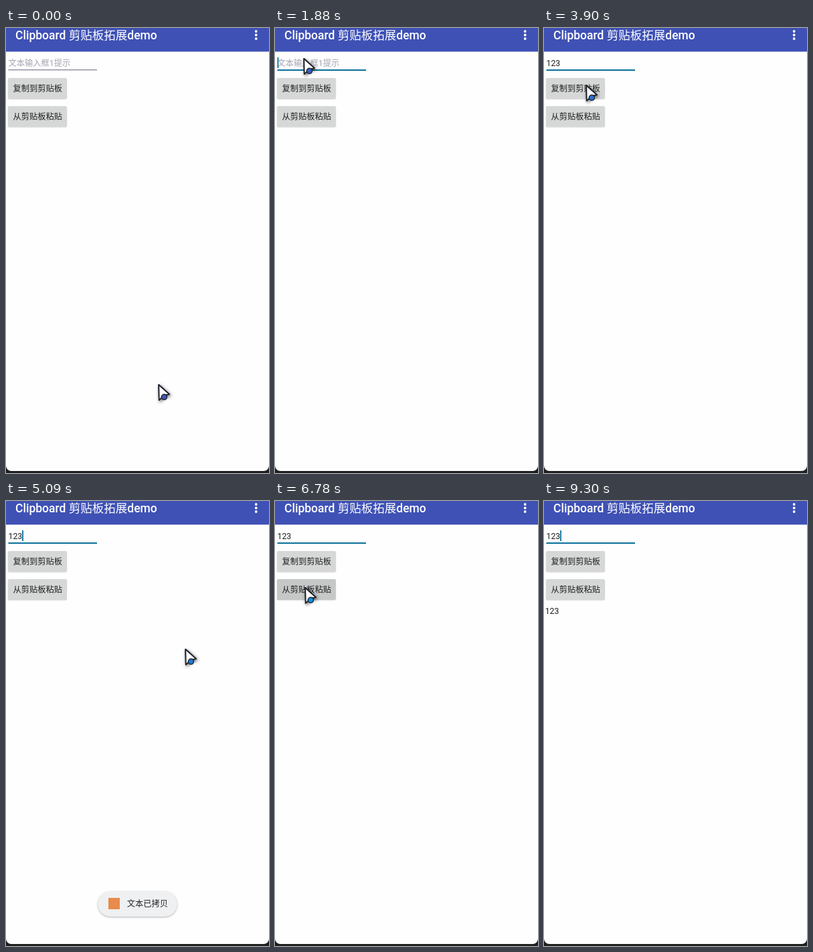
These frames come from a looping animation (393 px wide and 666 px high, 9.43 s). An HTML page with a canvas:

```html
<!DOCTYPE html>
<html lang="zh-CN">
<head>
<meta charset="utf-8">
<title>Clipboard demo</title>
<style>
html, body { margin: 0; width: 100%; height: 100%; overflow: hidden; background: #fff; }
canvas { display: block; width: 393px; height: 666px; }
</style>
</head>
<body>
<canvas id="stage"></canvas>
<script>
const W = 393, H = 666, LOOP = 9430;
const canvas = document.getElementById('stage');
const ctx = canvas.getContext('2d');
const dpr = window.devicePixelRatio || 1;
canvas.width = W * dpr;
canvas.height = H * dpr;

const FONT = 'Roboto, "Noto Sans CJK SC", "Noto Sans CJK", sans-serif';
const SMALL = '400 12.25px ' + FONT;
const TEAL = '#08709a';

// User actions, in ms
const FOCUS = 1840, KEYS = [2330, 2550, 3100];
const COPY = 3620, PASTE = 6650, PRESS = 270, PASTED = 7010;
const BLINK = 990, STEP = 90, FADE = 170, LEAVE = 8180;

// Pointer glides: begin, end, and the place reached
const HOME = { x: 227, y: 532 };
const glides = [
  [70, 70, 218, 428],
  [580, 890, 90, 298],
  [1050, 1230, 64, 128],
  [1350, 1880, 42, 44],
  [2650, 2860, 61, 73],
  [2930, 3330, 62, 84],
  [4740, 5090, 267, 220],
  [5560, 5630, 250, 255],
  [5790, 6030, 73, 247],
  [6090, 6570, 44, 128],
  [6920, 7380, 303, 392],
  [7790, 7980, 304, 543]
];
const toasts = [
  { text: '文本已拷贝', from: 4090, to: 6000 },
  { text: '文本已粘贴', from: 7100, to: 9280 }
];

const clamp = v => Math.min(1, Math.max(0, v));
const mix = (a, b, u) => a + (b - a) * u;
const easeOut = u => 1 - (1 - u) ** 2;

function pointerAt(t) {
  let { x, y } = HOME;
  for (const [begin, end, toX, toY] of glides) {
    if (t < begin) break;
    const last = Math.round((end - begin) / STEP);
    const done = t >= end ? last : Math.floor((t - begin) / (end - begin) * last);
    const u = easeOut((done + 1) / (last + 1));
    x = mix(x, toX, u);
    y = mix(y, toY, u);
  }
  return { x, y };
}

function box(x, y, w, h, r, fill) {
  ctx.fillStyle = fill;
  ctx.beginPath();
  ctx.roundRect(x, y, w, h, r);
  ctx.fill();
}

function dot(x, y, r) {
  ctx.beginPath();
  ctx.arc(x, y, r, 0, Math.PI * 2);
  ctx.fill();
}

function label(str, x, y, color, font = SMALL) {
  ctx.font = font;
  ctx.fillStyle = color;
  ctx.fillText(str, x, y);
}

function shadow(color, blur, dx, dy) {
  ctx.shadowColor = color;
  ctx.shadowBlur = blur * dpr;
  ctx.shadowOffsetX = dx * dpr;
  ctx.shadowOffsetY = dy * dpr;
}

function drawPage() {
  ctx.fillStyle = '#1f1f1f';
  ctx.fillRect(0, 0, W, H);
  box(0, -20, W, 683, 8, '#fefefe');
  ctx.fillStyle = '#3f51b5';
  ctx.fillRect(0, 0, W, 35.4);
  label('Clipboard 剪贴板拓展demo', 14, 17.4, '#fff', '500 17.5px ' + FONT);
  ctx.fillStyle = '#fff';
  for (let i = 0; i < 3; i++) dot(373.7, 5 + 5.5 * i, 1.9);
}

function drawField(t) {
  const focused = t >= FOCUS;
  const keys = KEYS.filter(k => k <= t);
  const text = '123'.slice(0, keys.length);
  if (text) label(text, 3.5, 57, '#1c1c1c');
  else label('文本输入框1提示', 3.5, 56.8, '#a2a2b0');
  ctx.fillStyle = focused ? TEAL : '#86869c';
  ctx.fillRect(3.5, 62, 132.5, focused ? 2 : 1.3);

  const lastKey = keys.length ? keys[keys.length - 1] : FOCUS;
  if (focused && (t - lastKey) % BLINK < BLINK / 2) {
    ctx.font = SMALL;
    ctx.fillStyle = TEAL;
    ctx.fillRect(3.5 + ctx.measureText(text).width, 44, 1.8, 16);
  }
}

function drawButton(str, y, age) {
  const pressed = age >= 0 && age < PRESS;
  ctx.save();
  shadow('rgba(0,0,0,0.22)', 1.5, 0, 0.6);
  box(3, y, 87.8, 31, 1.8, pressed ? '#c6c7c7' : '#d6d7d7');
  ctx.restore();
  label(str, 10.6, y + 20.4, '#202020');
}

function drawToast({ text, from, to }, t) {
  if (t < from || t >= to) return;
  ctx.save();
  ctx.globalAlpha = clamp((to - t) / FADE);
  ctx.save();
  shadow('rgba(0,0,0,0.3)', 3, 0, 1);
  box(137.3, 584.3, 118.4, 37.7, 18.8, '#eff0f1');
  ctx.restore();
  box(153, 594, 17, 17, 0, '#e88b4c');
  label(text, 180.8, 607.4, '#222');
  ctx.restore();
}

function drawPointer(t) {
  if (t >= LEAVE) return;
  const { x, y } = pointerAt(t);
  const u = clamp(t / PASTED);
  ctx.save();
  ctx.translate(x, y);
  ctx.lineJoin = 'round';
  ctx.beginPath();
  ctx.moveTo(1.3, 2);
  ctx.lineTo(17, 16.2);
  ctx.lineTo(9.5, 17.6);
  ctx.lineTo(1.8, 24.8);
  ctx.closePath();
  ctx.strokeStyle = '#1d222b';
  ctx.lineWidth = 1.8;
  ctx.fillStyle = '#fff';
  ctx.save();
  shadow('rgba(0,0,0,0.55)', 5, 1.5, 2);
  ctx.fill();
  ctx.stroke();
  ctx.restore();
  ctx.fill();
  ctx.stroke();
  ctx.fillStyle = `hsl(${mix(228, 203, u)} ${mix(46, 88, u)}% 48%)`;
  ctx.lineWidth = 1.4;
  dot(9.4, 20.3, 4.1);
  ctx.stroke();
  ctx.restore();
}

function draw(t) {
  ctx.setTransform(dpr, 0, 0, dpr, 0, 0);
  drawPage();
  drawField(t);
  drawButton('复制到剪贴板', 75, t - COPY);
  drawButton('从剪贴板粘贴', 117, t - PASTE);
  if (t >= PASTED) label('123', 1.7, 168.8, '#1c1c1c');
  for (const toast of toasts) drawToast(toast, t);
  drawPointer(t);
}

const start = performance.now();
function tick() {
  draw((performance.now() - start) % LOOP);
  requestAnimationFrame(tick);
}
tick();
</script>
</body>
</html>
```
